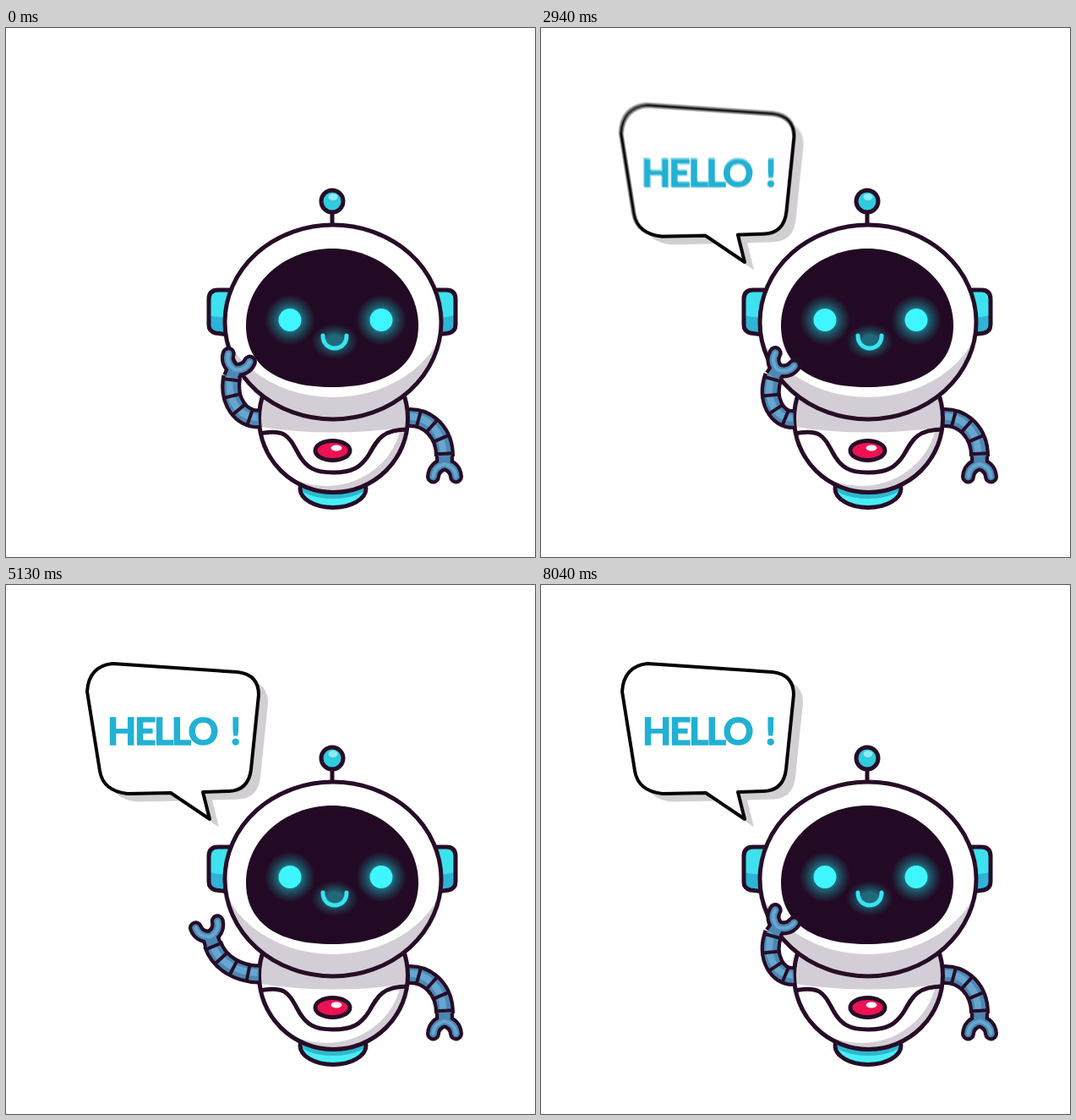
An HTML page that plays this animation: 626 by 626 pixels, repeating every 9000 ms.

```html
<!DOCTYPE html>
<html lang="en">
<head>
<meta charset="utf-8">
<title>Waving robot</title>
<style>
  html, body { margin: 0; width: 100%; height: 100%; overflow: hidden; background: #fff; }
  svg { display: block; width: 100vw; height: 100vh; }
  .line { stroke: #270d27; stroke-width: 5; stroke-linecap: round; stroke-linejoin: round; }
  .none { fill: none; }
  text {
    font: 700 44.5px Lato, Carlito, sans-serif; letter-spacing: -2.4px;
    fill: #22b1d3; stroke: #22b1d3; stroke-width: 1.5px;
  }
</style>
</head>
<body>
<svg viewBox="0 0 626 626">
  <defs>
    <radialGradient id="glow">
      <stop offset=".35" stop-color="#1fa9b4" stop-opacity=".8"/>
      <stop offset=".65" stop-color="#1c7f8c" stop-opacity=".5"/>
      <stop offset="1" stop-color="#1c6f7c" stop-opacity="0"/>
    </radialGradient>
    <clipPath id="headClip"><ellipse cx="387" cy="348" rx="128" ry="115"/></clipPath>
    <clipPath id="bodyClip"><ellipse cx="387.5" cy="462" rx="88" ry="87.5"/></clipPath>
    <clipPath id="baseClip"><ellipse cx="387" cy="545" rx="39" ry="22.5"/></clipPath>
    <path id="shell" d="M126 93L274 103Q299 106 299 130L290 218Q287 243 264 244L233 245L241 277L195 246L144 247Q115 244 111 220L96 126Q98 96 126 93Z"/>
    <g id="bubble">
      <rect x="-900" y="-900" width="2400" height="2400" fill="#fff"/>
      <use href="#shell" x="11" y="9.5" fill="#d2cfd2"/>
      <use href="#shell" fill="#fff" stroke="#050305" stroke-width="4" stroke-linejoin="round"/>
      <text x="120" y="188.5">HELLO<tspan x="265.5">!</tspan></text>
    </g>
    <g id="ear">
      <path d="M270 310H251Q240 310 240 321V351Q240 359 248 361L270 364Z" fill="#3de2ee"/>
      <path d="M240 340Q255 343 270 343V364L248 361Q240 359 240 351Z" fill="#2fb3d6"/>
      <path class="line none" d="M270 310H251Q240 310 240 321V351Q240 359 248 361L270 364"/>
    </g>
    <g id="eye">
      <circle r="30" fill="url(#glow)"/>
      <circle r="13.5" fill="#3ff5ff"/>
    </g>
  </defs>

  <g id="bubbles"></g>

  <g clip-path="url(#baseClip)">
    <rect x="340" y="520" width="95" height="55" fill="#48eef6"/>
    <ellipse cx="387" cy="537" rx="44" ry="20" fill="#2fb8cd"/>
  </g>
  <ellipse class="line none" cx="387" cy="545" rx="39" ry="22.5"/>
  <g id="rightArm"></g>

  <g clip-path="url(#bodyClip)">
    <rect x="295" y="370" width="185" height="185" fill="#d3ced5"/>
    <ellipse cx="379" cy="456" rx="90" ry="86" fill="#fff"/>
    <path d="M295 380H480V471Q387 486 295 471Z" fill="#d3ced5"/>
    <path class="line none" d="M299 480C330 474 334 482 345 502C355 521 366 526 387 526C410 526 420 520 430 504C440 486 446 475 476 475"/>
  </g>
  <ellipse class="line none" cx="387.5" cy="462" rx="88" ry="87.5"/>
  <ellipse class="line" cx="386.5" cy="500" rx="20.5" ry="11.5" fill="#ee1252"/>
  <ellipse cx="391" cy="497" rx="6.5" ry="3.5" fill="#fff"/>

  <use href="#ear"/>
  <use href="#ear" transform="matrix(-1 0 0 1 772 0)"/>
  <path class="line" d="M386 219V232"/>
  <circle class="line" cx="386" cy="205" r="13" fill="#30cbdd"/>
  <ellipse cx="387" cy="200" rx="5.5" ry="4" fill="#8cebf2"/>

  <g clip-path="url(#headClip)">
    <rect x="255" y="230" width="265" height="240" fill="#d3ced5"/>
    <ellipse cx="387" cy="325" rx="136" ry="112" fill="#fff"/>
  </g>
  <ellipse class="line none" cx="387" cy="348" rx="128" ry="115"/>
  <path fill="#220a24" d="M386 261C440 261 488 300 488 352C488 400 450 425 386 425C322 425 284 400 284 352C284 300 332 261 386 261Z"/>
  <ellipse cx="389" cy="371" rx="28" ry="21" fill="url(#glow)" opacity=".75"/>
  <path class="none" d="M375 364C375 384 403 384 403 364" stroke="#38e4f0" stroke-width="5" stroke-linecap="round"/>
  <use class="eye" href="#eye" data-x="336"/>
  <use class="eye" href="#eye" data-x="444"/>
  <g id="leftArm"></g>
</svg>
<script>
  const LOOP = 9000, STEP = 30;
  const DARK = '#270d27', BLUE = '#4d88b2', LIGHT = '#66a6cf';
  const $ = id => document.getElementById(id);
  const lerp = (a, b, p) => a + (b - a) * p;

  // time, wave position: 0 = raised to the face, 1 = stretched out
  const WAVE = [
    [0, .21], [540, 1], [700, 1], [1380, 0], [1470, 0], [2070, 1], [2190, 1],
    [2850, 0], [2970, 0], [3690, 1], [3800, 1], [4500, 0], [4650, 0], [5260, 1],
    [5400, 1], [6060, 0], [6210, 0], [6840, 1], [6960, 1], [7620, 0], [LOOP, 0]
  ];
  const BLINKS = [1320, 2520, 3710, 4950, 6420, 7870];
  const BLINK_MS = 160;

  // shoulder, two controls, wrist as x,y pairs
  const RAISED = [299, 463, 280, 464, 265, 441, 275, 412];
  const STRETCHED = [299, 460, 275, 459, 250, 450, 238, 431];
  const HANGING = [476, 461, 500, 460, 519, 479, 519, 507];

  const stroke = (d, color, width, cap = 'butt') =>
    `<path d="${d}" fill="none" stroke="${color}" stroke-width="${width}" stroke-linecap="${cap}"/>`;

  function cubic(c, t, axis) {
    const u = 1 - t, [a, b, d, e] = [0, 2, 4, 6].map(i => c[i + axis]);
    return {
      at: u * u * u * a + 3 * u * u * t * b + 3 * u * t * t * d + t * t * t * e,
      slope: u * u * (b - a) + 2 * u * t * (d - b) + t * t * (e - d)
    };
  }

  function band(c, t) {
    const x = cubic(c, t, 0), y = cubic(c, t, 1);
    const k = 10 / Math.hypot(x.slope, y.slope);
    const dx = -y.slope * k, dy = x.slope * k;
    return `M${x.at - dx} ${y.at - dy}L${x.at + dx} ${y.at + dy}`;
  }

  function arm(c, angle) {
    const tube = `M${c[0]} ${c[1]}C${c.slice(2).join(' ')}`;
    const neck = 'M0 1V-9';
    const claw = 'M-13.5 -24C-13 -16 -8 -11 0 -9C8 -11 13 -16 13.5 -24';
    const hand = `<g transform="translate(${c[6]} ${c[7]}) rotate(${angle})">`;
    return stroke(tube, DARK, 24) +
      hand + stroke(neck, DARK, 22) + stroke(claw, DARK, 17, 'round') + '</g>' +
      stroke(tube, BLUE, 15.5) +
      `<g transform="translate(-1.5 -1.5)">${stroke(tube, LIGHT, 8)}</g>` +
      hand + stroke(neck, BLUE, 13.5) + stroke(claw, BLUE, 8.5, 'round') +
      stroke(claw, LIGHT, 4, 'round') + '</g>' +
      stroke([.18, .45, .72, .96].map(t => band(c, t)).join(''), DARK, 4);
  }

  function wave(t) {
    const i = WAVE.findIndex(k => k[0] > t);
    const [t0, a] = WAVE[i - 1], [t1, b] = WAVE[i];
    const p = (t - t0) / (t1 - t0);
    return lerp(a, b, lerp(p, p * p * (3 - 2 * p), .4));
  }

  function leftArm(p) {
    const c = RAISED.map((v, i) => lerp(v, STRETCHED[i], p));
    c[7] -= 20 * p * (1 - p);
    return arm(c, lerp(34, -28, p));
  }

  function eyeScale(t) {
    const start = BLINKS.find(b => t > b && t < b + BLINK_MS);
    return start === undefined ? 1 : 1 - .9 * Math.sin(Math.PI * (t - start) / BLINK_MS);
  }

  // linear growth, then a damped spring
  function bubbleScale(t) {
    const s = (t - 2820) / 1000;
    if (s < 0) return Math.max(0, 1 + 6 * s);
    return 1 + .46 * Math.sin(8.2 * Math.PI * s) * Math.exp(-8 * s);
  }

  // several copies averaged over a short shutter while the bubble moves
  const COPIES = 5, SHUTTER = 4;
  const copies = Array.from({ length: COPIES }, (_, i) => {
    const use = document.createElementNS('http://www.w3.org/2000/svg', 'use');
    use.setAttribute('href', '#bubble');
    use.setAttribute('opacity', 1 / (i + 1));
    return $('bubbles').appendChild(use);
  });

  function drawBubble(t) {
    const moving = t < 3400;
    copies.forEach((use, i) => {
      const shift = moving ? (i / (COPIES - 1) - .5) * SHUTTER : 0;
      const s = moving ? bubbleScale(t + shift) : 1;
      use.style.display = t < 2640 || (!moving && i) ? 'none' : '';
      use.setAttribute('transform', `translate(243 280) scale(${s}) translate(-243 -280)`);
    });
  }

  const eyes = document.querySelectorAll('.eye');
  $('rightArm').innerHTML = arm(HANGING, 180);

  function draw(now) {
    const t = Math.floor((now % LOOP) / STEP) * STEP;
    $('leftArm').innerHTML = leftArm(wave(t));
    for (const eye of eyes)
      eye.setAttribute('transform', `translate(${eye.dataset.x} 345.5) scale(1 ${eyeScale(t)})`);
    drawBubble(t);
  }

  const begin = performance.now();
  function tick() {
    draw(performance.now() - begin);
    requestAnimationFrame(tick);
  }
  tick();
</script>
</body>
</html>
```
